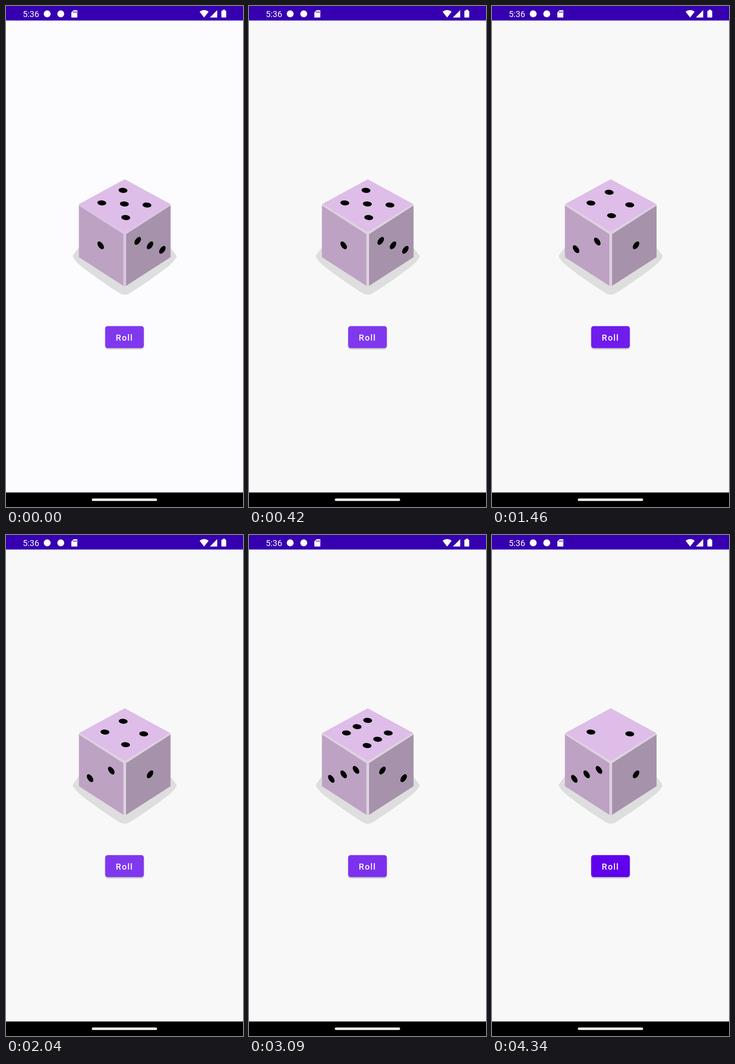
Write an HTML page that moves like this. It is 515 px wide and 1087 px high and loops after 4420 ms.

```html
<!DOCTYPE html>
<html lang="en">
<head>
<meta charset="utf-8">
<title>Dice roller</title>
<style>
html, body { margin: 0; width: 100%; height: 100%; overflow: hidden; background: #f8f8f8; }
svg { display: block; width: 100%; height: 100%; }
text { font-family: Roboto, sans-serif; font-size: 18.4px; fill: #fff; }
</style>
</head>
<body>
<svg viewBox="0 0 515 1087" xmlns="http://www.w3.org/2000/svg">
  <defs>
    <filter id="soft" x="-20%" y="-20%" width="140%" height="150%"><feGaussianBlur stdDeviation="1.6"/></filter>
  </defs>
  <rect id="page" width="515" height="1087"/>

  <g id="status" fill="#fff">
    <rect width="515" height="31.5" fill="#3600b1"/>
    <text x="36.5" y="23.8">5:36</text>
    <circle cx="89.5" cy="17" r="7.5"/>
    <circle cx="119" cy="17" r="7.5"/>
    <path d="M147 9h7q1 0 1 1v14q0 1-1 1h-11q-1 0-1-1v-10z"/>
    <path d="M146.7 11.5v3.5m3-3.5v3.5m3-3.5v3.5" stroke="#3600b1" stroke-width="1.4"/>
    <path d="M430.5 25L420.7 12.5Q430.5 5 440.3 12.5Z"/>
    <path d="M443 25L459 9V25Z"/>
    <path d="M471 8h5v2h1q1.5 0 1.5 1.5v12q0 1.5-1.5 1.5h-7.5q-1.5 0-1.5-1.5v-12q0-1.5 1.5-1.5h1.5z"/>
  </g>

  <g id="die">
    <path d="M158 524L145.5 541Q144.5 543 146 545.5Q152 556 165 566Q205 597 246 622.5Q258 630.5 270 622.5Q311 597 351 566Q364 556 370 545.5Q371.5 543 370 541L357 524Z" fill="#dedede"/>
    <path id="edges" d="M258 376L357.5 430V545L260 608H256L158.5 545V430Z"/>
    <path d="M258 376L356 429.5L258 490L160 429.5Z" fill="#debde8"/>
    <path d="M158.5 433L255 495V607L158.5 545Z" fill="#bda2c4"/>
    <path d="M357.5 433L261 495V607L357.5 545Z" fill="#a692ab"/>
    <g id="pips"></g>
  </g>

  <g id="button">
    <rect x="216" y="698" width="83" height="46" rx="5" opacity=".32" filter="url(#soft)"/>
    <rect id="fill" x="215.5" y="694.6" width="84" height="47.3" rx="5.2"/>
    <text x="238.5" y="725.6" font-weight="500" letter-spacing="1.64">Roll</text>
  </g>

  <rect y="1055.5" width="515" height="31.5"/>
  <rect x="186.500" y="1068.600" width="141.800" height="5.300" rx="2.650" fill="#efedeb"/>
</svg>
<script>
const LOOP = 4420;
const FIRST_ROLL = 1385, ROLL_GAP = 1075, HOLD = 510;
const FADE_IN = 75, FADE_OUT = 150;
const $ = id => document.getElementById(id);

// Each face has a centre, two axes in perspective and the tilt of its pips.
const FACES = [
  { c: [257.2, 429.5], u: [26, 15.9], v: [-23, 13.6], tilt: 5 },
  { c: [205.7, 519.3], u: [26.8, 17.3], v: [0, 27], tilt: 55 },
  { c: [313, 519.3], u: [26.8, -17.3], v: [0, -27], tilt: -55 }
];

// Top, left and right values shown after each roll.
const ROLLS = ["513", "421", "632", "231"];

const clamp = v => Math.max(0, Math.min(1, v));
const mix = (a, b, k) => `rgb(${a.map((v, i) => Math.round(v + (b[i] - v) * k))})`;

// Pip places on a flat face, from -1 to 1 each way.
function layout(n) {
  const s = n % 2 ? 1 : 0.86;
  const v = n === 6 ? 1 : s;
  const spots = n % 2 ? [[0, 0]] : [];
  if (n > 1) spots.push([s, -v], [-s, v]);
  if (n > 3) spots.push([s, v], [-s, -v]);
  if (n === 6) spots.push([s, 0], [-s, 0]);
  return spots;
}

function facePips({ c, u, v, tilt }, n) {
  return layout(n).map(([a, b]) => {
    const [x, y] = c.map((mid, i) => mid + a * u[i] + b * v[i]);
    return `<ellipse rx="9.7" ry="5.4" transform="translate(${x} ${y}) rotate(${tilt})"/>`;
  }).join("");
}

// The button lights up on a press and fades when the die is rolled.
function glow(t, count) {
  const next = FIRST_ROLL + count * ROLL_GAP;
  const rise = count < ROLLS.length - 1 ? clamp((t - next + HOLD) / FADE_IN) : 0;
  const fall = 1 - clamp((t - next + ROLL_GAP) / FADE_OUT);
  return count ? Math.max(rise, fall) : 1;
}

let shown = -1;
function draw(t) {
  const count = Math.max(0, Math.floor((t - FIRST_ROLL) / ROLL_GAP) + 1);
  const roll = Math.min(count, ROLLS.length - 1);
  if (roll !== shown) {
    $("pips").innerHTML = FACES.map((face, i) => facePips(face, +ROLLS[roll][i])).join("");
    shown = roll;
  }
  const settle = clamp(t / 400);
  $("page").setAttribute("fill", mix([252, 251, 253], [248, 248, 248], settle));
  $("edges").setAttribute("fill", mix([220, 196, 228], [222, 209, 224], settle));
  $("fill").setAttribute("fill", mix([96, 0, 236], [128, 56, 238], glow(t, count)));
}

function tick() {
  draw(performance.now() % LOOP);
  requestAnimationFrame(tick);
}
tick();
</script>
</body>
</html>
```
